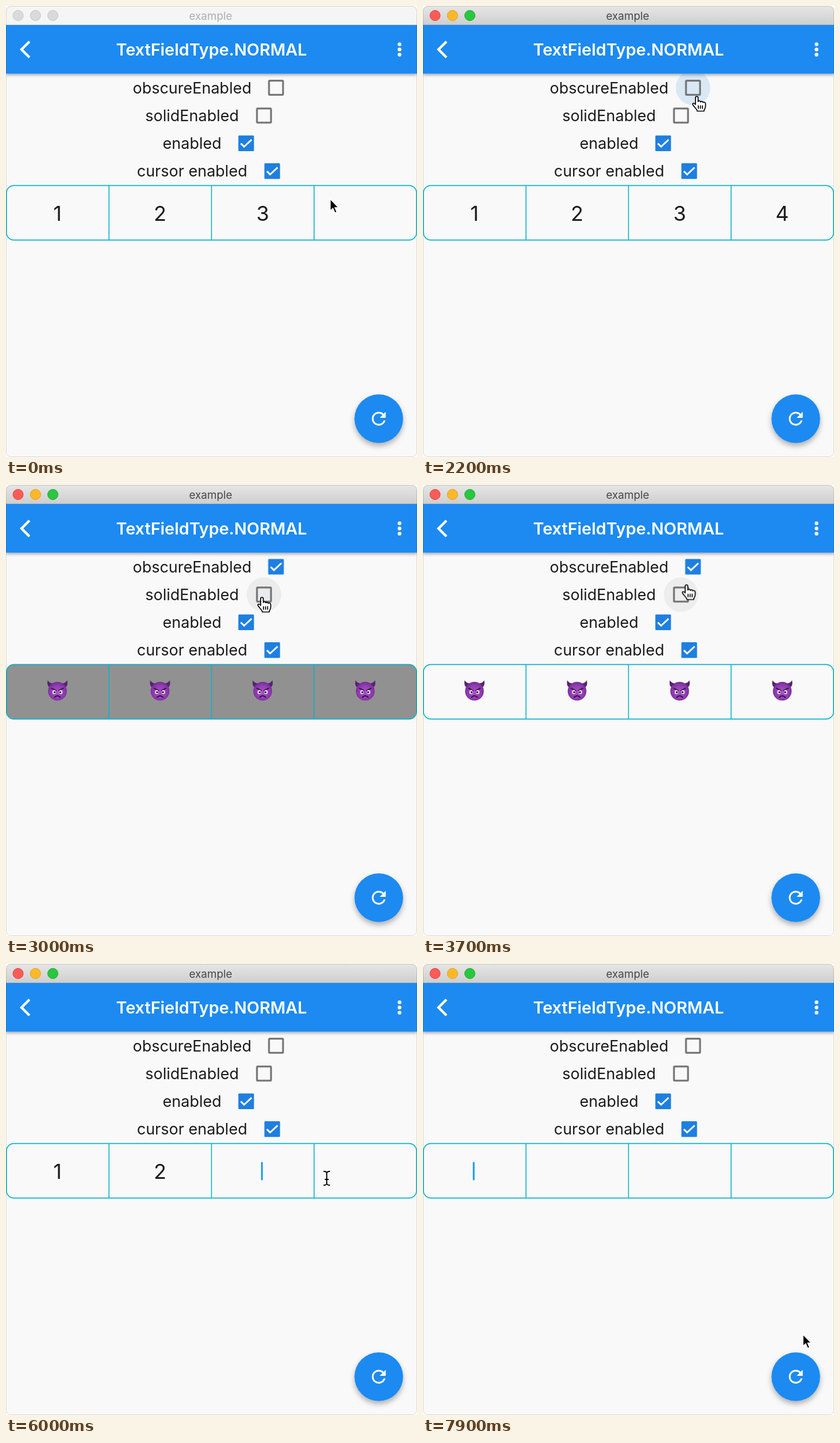
Write an HTML page that moves like this. It is 715 px wide and 783 px high and loops after 8000 ms.

```html
<!DOCTYPE html>
<html lang="en">
<head>
<meta charset="utf-8">
<title>example</title>
<style>
  html, body { margin: 0; width: 100%; height: 100%; overflow: hidden; background: #fff; }
  svg { display: block; width: 715px; height: 783px; border-radius: 8px; }
  text { font-family: Inter, Roboto, sans-serif; text-anchor: middle; fill: #1b1b1b; }
  .label { font-size: 27px; }
  .digit { font-size: 36px; }
  .title { font-size: 28.8px; font-weight: 600; fill: #fff; }
  .caption { font-size: 18.9px; fill: #474747; }
  .cyan { fill: none; stroke: #0cb4c8; stroke-width: 1.6; }
  .fill { fill: #1e7fe0; transform-box: fill-box; transform-origin: center; }
  .tick { fill: none; stroke: #fff; stroke-width: 2.9; stroke-dasharray: 1 2; }

  /* One shared 8 s clock; 1% is 80 ms. */
  .step, .move { animation-duration: 8s; animation-iteration-count: infinite; }
  .step { animation-timing-function: step-end; }
  .move { animation-timing-function: linear; }

  #inactive { animation-name: inactive; }
  @keyframes inactive { 0% { opacity: 1 } 6.25%, 100% { opacity: 0 } }

  #pointer { animation-name: pointer; animation-timing-function: ease-in-out; }
  @keyframes pointer {
    0%, 5% { transform: translate(564px, 335px) }
    12.5%, 20.625% { transform: translate(593px, 350px) }
    27.5%, 31.25% { transform: translate(477px, 157px) }
    36.25%, 43.75% { transform: translate(446px, 195px) }
    48.75%, 51.25% { transform: translate(472px, 152px) }
    52.5%, 57.5% { transform: translate(487px, 202px) }
    66.25%, 83.75% { transform: translate(558px, 372px) }
    96.25%, 100% { transform: translate(661px, 643px) }
  }
  #arrow { animation-name: arrow; }
  @keyframes arrow {
    0%, 23.75%, 32%, 52%, 86.25%, 100% { opacity: 1 }
    7.5%, 26.25%, 34.4%, 63.4% { opacity: 0 }
  }
  #beam { animation-name: beam; }
  @keyframes beam {
    0%, 23.75%, 86.25%, 100% { opacity: 0 }
    7.5%, 63.4% { opacity: 1 }
  }
  #hand { animation-name: hand; }
  @keyframes hand {
    0%, 32%, 52%, 100% { opacity: 0 }
    26.25%, 34.4% { opacity: 1 }
  }

  #haloA { animation-name: haloA; }
  @keyframes haloA {
    0%, 26.25%, 33%, 46.9%, 52.4%, 100% { opacity: 0 }
    27.4%, 31.25%, 48%, 51.25% { opacity: 1 }
  }
  #haloB { animation-name: haloB; }
  @keyframes haloB {
    0%, 34.4%, 48%, 100% { opacity: 0 }
    36%, 46% { opacity: 1 }
  }

  #boxA .fill { animation-name: fillA; }
  @keyframes fillA {
    0%, 28.75%, 53.75%, 100% { opacity: 0; transform: scale(.94) }
    30% { opacity: 1; transform: scale(.94) }
    31.25%, 51.25% { opacity: 1; transform: none }
    52.5% { opacity: 1; transform: scale(.94) }
  }
  #boxA .tick { animation-name: tickA; }
  @keyframes tickA {
    0%, 30%, 52.4%, 100% { stroke-dashoffset: 1.02 }
    31.25%, 51.25% { stroke-dashoffset: 0 }
  }
  #boxA .frame { animation-name: frameA; }
  @keyframes frameA { 0%, 53.1%, 100% { opacity: 1 } 30% { opacity: 0 } }

  #boxB .fill { animation-name: fillB; }
  @keyframes fillB {
    0%, 37.5%, 46.25%, 100% { opacity: 0; transform: scale(.94) }
    38.75%, 45% { opacity: 1; transform: scale(.94) }
    40%, 43.75% { opacity: 1; transform: none }
  }
  #boxB .tick { animation-name: tickB; }
  @keyframes tickB {
    0%, 38.75%, 45%, 100% { stroke-dashoffset: 1.02 }
    40%, 43.75% { stroke-dashoffset: 0 }
  }
  #boxB .frame { animation-name: frameB; }
  @keyframes frameB { 0%, 45.6%, 100% { opacity: 1 } 38.75% { opacity: 0 } }

  #solid { animation-name: solid; }
  @keyframes solid { 0%, 43.75%, 100% { opacity: 0 } 37.4% { opacity: 1 } }
  #plain { animation-name: plain; }
  @keyframes plain { 0%, 51.25%, 100% { opacity: 1 } 28.75% { opacity: 0 } }
  #masked { animation-name: masked; }
  @keyframes masked { 0%, 51.25%, 100% { opacity: 0 } 28.75% { opacity: 1 } }

  #d1 { animation-name: d1; }
  #d2 { animation-name: d2; }
  #d3 { animation-name: d3; }
  #d4 { animation-name: d4; }
  @keyframes d1 { 0% { opacity: 1 } 80.625%, 100% { opacity: 0 } }
  @keyframes d2 { 0% { opacity: 1 } 77.5%, 100% { opacity: 0 } }
  @keyframes d3 { 0% { opacity: 1 } 74.375%, 100% { opacity: 0 } }
  @keyframes d4 { 0%, 71.25%, 100% { opacity: 0 } 20.625% { opacity: 1 } }

  #caretX { animation-name: caretX; }
  @keyframes caretX {
    0% { transform: translateX(535.5px) }
    74.375% { transform: translateX(357px) }
    77.5% { transform: translateX(178.5px) }
    80.625%, 100% { transform: none }
  }
  #caret { animation-name: blink; }
  @keyframes blink {
    0%, 7.49%, 20.625%, 71.24%, 90%, 93.125% { opacity: 0 }
    7.5%, 13.75%, 71.25%, 86.875%, 96.25%, 99.375% { opacity: 1 }
    16.875%, 20% { opacity: .05 }
    100% { opacity: .8 }
  }
</style>
</head>
<body>
<svg viewBox="0 0 715 783">
  <defs>
    <linearGradient id="bar" x2="0" y2="1">
      <stop stop-color="#e6e6e6"/><stop offset="1" stop-color="#cecece"/>
    </linearGradient>
    <radialGradient id="skin" cy=".55" r=".55">
      <stop stop-color="#a851c4"/><stop offset=".6" stop-color="#933fb2"/><stop offset="1" stop-color="#742b96"/>
    </radialGradient>
    <filter id="barShadow" x="-5%" y="-20%" width="110%" height="150%">
      <feDropShadow dx="0" dy="2.5" stdDeviation="2.5" flood-opacity=".32"/>
    </filter>
    <filter id="fabShadow" x="-30%" y="-30%" width="160%" height="160%">
      <feDropShadow dx="0" dy="5" stdDeviation="5" flood-opacity=".3"/>
    </filter>
    <rect id="frame" x="-12.2" y="-12.2" width="24.4" height="24.4" rx="1" fill="none" stroke="#6c6c6c" stroke-width="3"/>
    <rect id="block" x="-13.6" y="-13.6" width="27.2" height="27.2" rx="1.5"/>
    <path id="tick" d="M-9.3 .2L-3.6 5.9L9.4 -6.3" pathLength="1"/>
    <g id="imp">
      <path d="M-17 -18Q-19.500 -5 -10 -5L-5 -13Q-13 -11 -17 -18ZM17 -18Q19.500 -5 10 -5L5 -13Q13 -11 17 -18Z" fill="#582173"/>
      <circle r="16.300" cy="1" fill="url(#skin)"/>
      <path d="M-10 -4L-2.500 0M10 -4L2.500 0" stroke="#3d1450" stroke-width="2" stroke-linecap="round"/>
      <ellipse cx="-5.700" cy="2.500" rx="3" ry="3.500" fill="#f4e9f8"/>
      <ellipse cx="5.700" cy="2.500" rx="3" ry="3.500" fill="#f4e9f8"/>
      <circle cx="-5" cy="2.700" r="1.800" fill="#30103f"/>
      <circle cx="5" cy="2.700" r="1.800" fill="#30103f"/>
      <path d="M-5 11.500Q0 6.500 5 11.500" fill="none" stroke="#30103f" stroke-width="2" stroke-linecap="round"/>
    </g>
    <path id="ibeam" d="M-5 -12Q-1 -12 0 -9.500Q1 -12 5 -12M0 -10V10M-5 12Q-1 12 0 9.500Q1 12 5 12M-2.700 2H2.700" fill="none" stroke-linecap="round"/>
  </defs>

  <rect width="715" height="783" fill="#f9f9f9"/>

  <circle id="haloA" class="move" cx="469.700" cy="142" r="30" fill="#d8e8f5"/>
  <circle id="haloB" class="move" cx="448.800" cy="190.200" r="30" fill="#ececec"/>

  <g class="label">
    <text x="323.700" y="151.500">obscureEnabled</text>
    <text x="323.700" y="199.800">solidEnabled</text>
    <text x="323.700" y="248.100">enabled</text>
    <text x="323.700" y="296.400">cursor enabled</text>
  </g>

  <g id="boxA" transform="translate(469.700 141.900)">
    <use href="#frame" class="frame step"/>
    <use href="#block" class="fill move"/>
    <use href="#tick" class="tick move"/>
  </g>
  <g id="boxB" transform="translate(448.800 190.200)">
    <use href="#frame" class="frame step"/>
    <use href="#block" class="fill move"/>
    <use href="#tick" class="tick move"/>
  </g>
  <g transform="translate(417.800 238.400)">
    <use href="#block" class="fill"/><use href="#tick" class="tick"/>
  </g>
  <g transform="translate(463.100 286.700)">
    <use href="#block" class="fill"/><use href="#tick" class="tick"/>
  </g>

  <rect id="solid" class="step" x="1" y="311.500" width="713" height="95" rx="13" fill="#919191"/>
  <rect class="cyan" x=".8" y="311.600" width="713.400" height="94.800" rx="13"/>
  <path class="cyan" d="M179.200 311.500V406.500M357.500 311.500V406.500M536 311.500V406.500"/>

  <g id="plain" class="digit step">
    <text id="d1" class="step" x="89.500" y="373">1</text>
    <text id="d2" class="step" x="268" y="373">2</text>
    <text id="d3" class="step" x="446.500" y="373">3</text>
    <text id="d4" class="step" x="625" y="373">4</text>
  </g>
  <g id="masked" class="step">
    <use href="#imp" x="89.500" y="357"/>
    <use href="#imp" x="268" y="357"/>
    <use href="#imp" x="446.500" y="357"/>
    <use href="#imp" x="625" y="357"/>
  </g>
  <g id="caretX" class="step">
    <rect id="caret" class="move" x="86.700" y="343.500" width="3" height="32" rx="1.500" fill="#169be9"/>
  </g>

  <rect y="33" width="715" height="84.500" fill="#1e8af1" filter="url(#barShadow)"/>
  <path d="M40.800 61.800L27 75.500L40.800 89.200" fill="none" stroke="#fff" stroke-width="4.400"/>
  <text class="title" x="357.500" y="86">TextFieldType.NORMAL</text>
  <g fill="#fff">
    <circle cx="684.600" cy="66.500" r="3.200"/>
    <circle cx="684.600" cy="75.500" r="3.200"/>
    <circle cx="684.600" cy="84.500" r="3.200"/>
  </g>

  <rect width="715" height="33" fill="url(#bar)"/>
  <rect y="32" width="715" height="1" fill="#b4b4b4"/>
  <circle cx="21" cy="16.500" r="9" fill="#fc5b57" stroke="#e2443f"/>
  <circle cx="51.300" cy="16.500" r="9" fill="#fdb827" stroke="#dfa023"/>
  <circle cx="81.500" cy="16.500" r="9" fill="#29c641" stroke="#1dac2c"/>
  <text class="caption" x="356" y="24">example</text>
  <g id="inactive" class="step">
    <rect width="715" height="33" fill="#f5f5f5"/>
    <rect y="32" width="715" height="1" fill="#dadada"/>
    <g fill="#dadada" stroke="#c6c6c6">
      <circle cx="21" cy="16.500" r="9"/>
      <circle cx="51.300" cy="16.500" r="9"/>
      <circle cx="81.500" cy="16.500" r="9"/>
    </g>
    <text class="caption" x="356" y="24" style="fill:#aeaeae">example</text>
  </g>

  <circle cx="648.500" cy="716.500" r="42.300" fill="#1e8af1" filter="url(#fabShadow)"/>
  <path transform="translate(630.400 698.400) scale(1.509)" fill="#fff" d="M17.650 6.350C16.200 4.900 14.210 4 12 4c-4.420 0-7.990 3.580-7.990 8s3.570 8 7.990 8c3.730 0 6.840-2.550 7.730-6h-2.080c-.82 2.330-3.040 4-5.650 4-3.310 0-6-2.690-6-6s2.690-6 6-6c1.660 0 3.140.69 4.220 1.780L13 11h7V4l-2.350 2.350z"/>

  <rect x=".5" y=".5" width="714" height="782" rx="8" fill="none" stroke="#000" stroke-opacity=".13"/>

  <g id="pointer" class="move">
    <path id="arrow" class="step" d="M0 0V20.500L4.700 16.300L8.200 24.300L11.600 22.800L8.200 15H14.500Z" stroke="#fff" stroke-width="1.500"/>
    <g id="beam" class="step">
      <use href="#ibeam" stroke="#fff" stroke-width="4"/>
      <use href="#ibeam" stroke="#000" stroke-width="1.900"/>
    </g>
    <g id="hand" class="step" fill="#fff" stroke="#000" stroke-width="1.700" stroke-linejoin="round">
      <path d="M-3 14V2.400C-3 -.8 1.600 -.8 1.600 2.400V9C2 7 5.600 7 6 9.600C6.600 8 9.600 8.300 10 10.400C11 9.200 14.500 9.800 14.500 12.500V17C14.500 21 11.800 22 11.800 25.500H0C0 22 -5 19 -7.500 14.500C-9 11.500 -5.500 10.500 -3 14Z"/>
      <path d="M2 15.500V21.500M5.600 15.500V21.500M9.200 15.500V21.500"/>
    </g>
  </g>
</svg>
</body>
</html>
```
